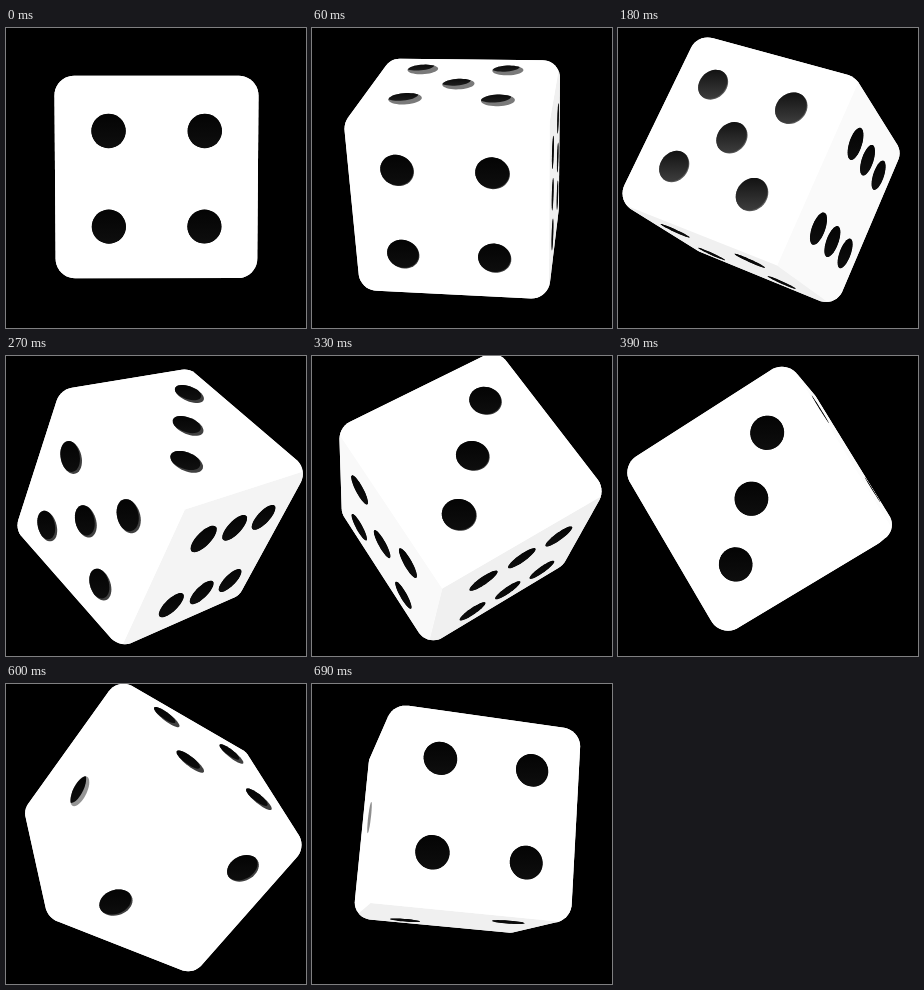
An HTML page with a canvas that plays this animation: 300x300 px, repeating every 0.72 s.

```html
<!DOCTYPE html>
<html lang="en">
<head>
<meta charset="utf-8">
<title>Rolling die</title>
<style>
  html, body { margin: 0; width: 100%; height: 100%; overflow: hidden; background: #000; }
  canvas { display: block; width: 300px; height: 300px; }
</style>
</head>
<body>
<canvas id="stage" width="300" height="300"></canvas>
<script>
const ctx = document.getElementById('stage').getContext('2d');
const STEP = 30, STEPS = 24;
const CENTER = { x: 150, y: 144.3 }, EYE = 900;
const HALF = 93, ROUND = 18, PIP_GAP = 43, PIP_RADIUS = 15.4;

// Poses: step, turn in degrees, turn axis (x right, y up, z to the viewer)
const POSES = [
  [0, 3.7, [1, .1, 0]],
  [4, 49.3, [.931, -.375, .009]],
  [9, 125.1, [.8765, -.481, .049]],
  [13, 183.75, [.87, -.488, .074]],
  [16, 229.1, [.825, -.565, .038]],
  [20, 290.2, [.8125, -.579, .075]],
  [23, 343.4, [.638, -.694, .333]]
].map(([step, turn, axis]) => ({ step, q: quaternion(turn, axis) }));

const four = [[-1, -1], [-1, 1], [1, -1], [1, 1]];
const FACES = [
  { axis: 0, sign: 1, pips: [...four, [0, -1], [0, 1]] },
  { axis: 0, sign: -1, pips: [[0, 0]] },
  { axis: 1, sign: 1, pips: [...four, [0, 0]] },
  { axis: 1, sign: -1, pips: [[-1, -1], [1, 1]] },
  { axis: 2, sign: 1, pips: four },
  { axis: 2, sign: -1, pips: [[-1, -1], [0, 0], [1, 1]] }
];

function quaternion(degrees, axis) {
  const half = degrees * Math.PI / 360, len = Math.hypot(...axis);
  return [Math.cos(half), ...axis.map(c => c / len * Math.sin(half))];
}

function slerp(a, b, k) {
  const dot = a.reduce((sum, c, i) => sum + c * b[i], 0);
  const angle = Math.acos(Math.min(1, dot));
  if (angle < 1e-6) return a;
  const wa = Math.sin((1 - k) * angle), wb = Math.sin(k * angle);
  return a.map((c, i) => (c * wa + b[i] * wb) / Math.sin(angle));
}

function poseAt(step) {
  let i = 0;
  while (i < POSES.length - 2 && step > POSES[i + 1].step) i++;
  const a = POSES[i], b = POSES[i + 1];
  return slerp(a.q, b.q, (step - a.step) / (b.step - a.step));
}

function rotate([w, x, y, z], [px, py, pz]) {
  const tx = 2 * (y * pz - z * py), ty = 2 * (z * px - x * pz), tz = 2 * (x * py - y * px);
  return [
    px + w * tx + y * tz - z * ty,
    py + w * ty + z * tx - x * tz,
    pz + w * tz + x * ty - y * tx
  ];
}

function project([x, y, z]) {
  const scale = EYE / (EYE - z);
  return { x: CENTER.x + x * scale, y: CENTER.y - y * scale, scale };
}

// Point on a face, u and v measured along the two following axes
function facePoint(face, u, v) {
  const p = [0, 0, 0];
  p[face.axis] = face.sign * HALF;
  p[(face.axis + 1) % 3] = u;
  p[(face.axis + 2) % 3] = v;
  return p;
}

function ring(count, make) {
  return Array.from({ length: count }, (_, i) => {
    const angle = i / count * Math.PI * 2;
    return make(Math.cos(angle), Math.sin(angle));
  });
}

function convexHull(points) {
  points.sort((a, b) => a.x - b.x || a.y - b.y);
  const chain = list => {
    const out = [];
    for (const p of list) {
      while (out.length > 1) {
        const a = out[out.length - 2], b = out[out.length - 1];
        if ((b.x - a.x) * (p.y - a.y) - (b.y - a.y) * (p.x - a.x) > 0) break;
        out.pop();
      }
      out.push(p);
    }
    return out.slice(0, -1);
  };
  return [...chain(points), ...chain(points.slice().reverse())];
}

function trace(points, dx = 0, dy = 0) {
  ctx.beginPath();
  for (const p of points) ctx.lineTo(p.x + dx, p.y + dy);
  ctx.closePath();
}

const clamp = (value, low, high) => Math.max(low, Math.min(high, value));
const gray = level => `rgb(${level}, ${level}, ${level})`;

function silhouette(q) {
  const points = [], inset = HALF - ROUND;
  for (const x of [-inset, inset])
    for (const y of [-inset, inset])
      for (const z of [-inset, inset]) {
        const c = project(rotate(q, [x, y, z]));
        const r = ROUND * c.scale;
        points.push(...ring(40, (cos, sin) => ({ x: c.x + r * cos, y: c.y + r * sin })));
      }
  return convexHull(points);
}

// Light from the upper left reaches the floor of a pip; its far wall shows as a crescent
function drawPip(q, face, [u, v], [nx, ny, nz], light) {
  const rim = ring(40, (cos, sin) => project(rotate(q, facePoint(face,
    u * PIP_GAP + PIP_RADIUS * cos, v * PIP_GAP + PIP_RADIUS * sin))));
  const floor = clamp((nz * (ny - .4 * nx) - .33) * 500, 10, 105);
  const wall = 64 + 130 * clamp(ny - nx - .5, 0, 1);
  const shift = light > .3 ? 6.3 * (1 - nz) : 0;
  const heights = rim.map(p => p.y);
  const shade = ctx.createLinearGradient(0, Math.min(...heights), 0, Math.max(...heights));
  shade.addColorStop(0, gray(floor * .4));
  shade.addColorStop(1, gray(floor * 1.4));
  ctx.save();
  trace(rim);
  ctx.fillStyle = shift > .5 ? gray(Math.max(wall, floor * 1.4)) : shade;
  ctx.fill();
  ctx.clip();
  trace(rim, -shift, -shift);
  ctx.fillStyle = shade;
  ctx.fill();
  ctx.restore();
}

function drawFace(q, face) {
  const unit = [0, 0, 0];
  unit[face.axis] = face.sign;
  const normal = rotate(q, unit);
  if (normal[2] * EYE <= HALF) return;
  const light = -.1 * normal[0] + .4 * normal[1] + .9 * normal[2];
  const corners = [[-1, -1], [1, -1], [1, 1], [-1, 1]];
  trace(corners.map(([u, v]) => project(rotate(q, facePoint(face, u * HALF, v * HALF)))));
  ctx.fillStyle = gray(255 - clamp((.3 - light) * 55, 0, 15));
  ctx.fill();
  for (const pip of face.pips) drawPip(q, face, pip, normal, light);
}

function draw(now) {
  const q = poseAt(Math.floor(now / STEP) % STEPS);
  ctx.fillStyle = '#000';
  ctx.fillRect(0, 0, 300, 300);
  ctx.save();
  trace(silhouette(q));
  ctx.fillStyle = '#fff';
  ctx.fill();
  ctx.clip();
  for (const face of FACES) drawFace(q, face);
  ctx.restore();
}

let start;
function tick(now) {
  start ??= now;
  draw(now - start);
  requestAnimationFrame(tick);
}
draw(0);
requestAnimationFrame(tick);
</script>
</body>
</html>
```
